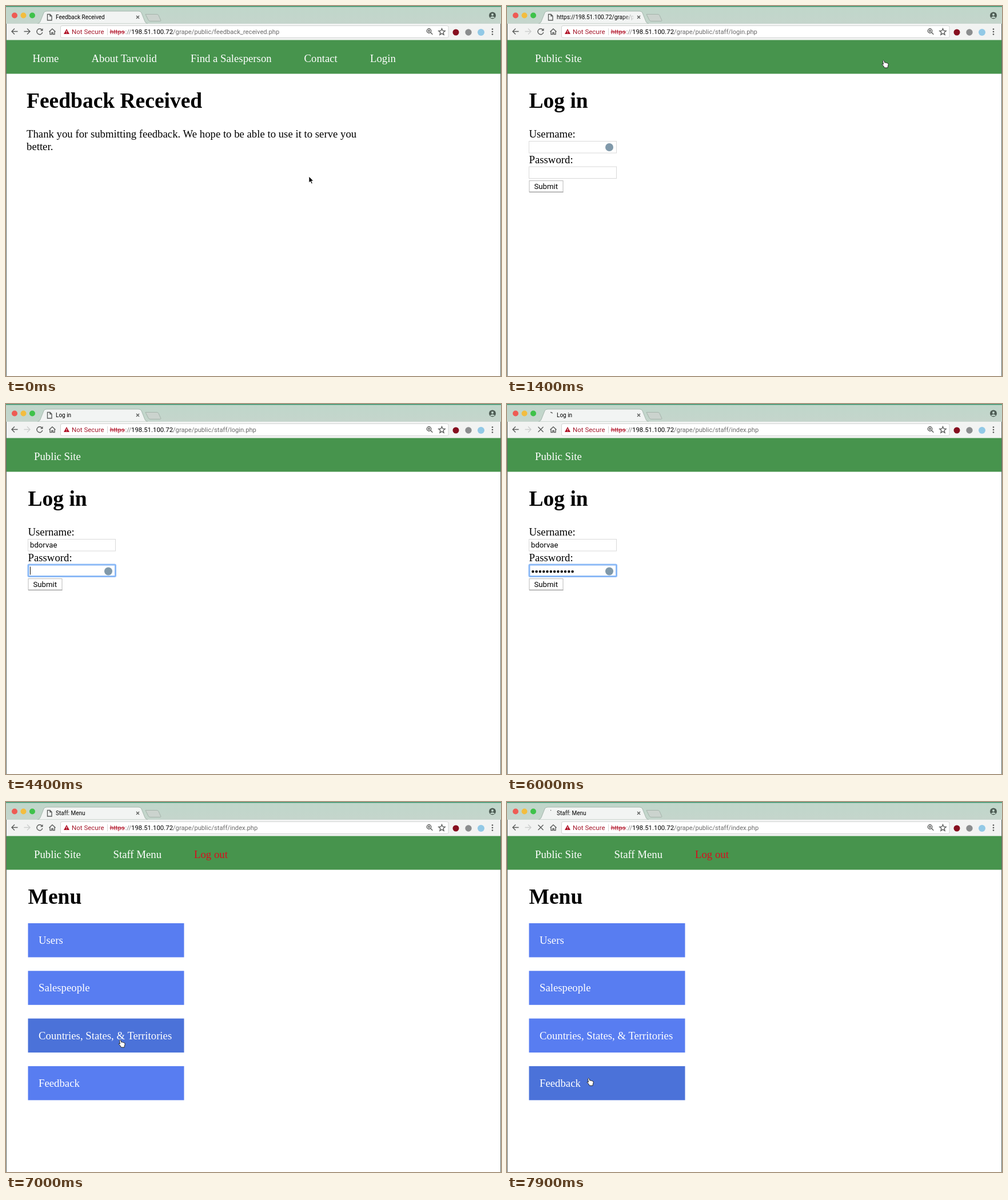
An HTML page for the animation above (8000 ms loop, 866 px wide and 647 px high).

```html
<!DOCTYPE html>
<html lang="en">
<head>
<meta charset="utf-8">
<title>Login walkthrough</title>
<style>
  html, body { margin: 0; width: 100%; height: 100%; overflow: hidden; background: #fff; }
  svg { display: block; }
  text { white-space: pre; }
  .serif { font: 18.75px "Liberation Serif", "Times New Roman", serif; }
  .serif .h1 { font-size: 37.5px; font-weight: bold; }
  .nav { fill: #fff; }
  .ui { font: 13.2px Roboto, "Liberation Sans", sans-serif; }
  .bar { font-size: 11.2px; }
  .icon { fill: none; stroke: #5b5d5c; stroke-width: 1.4; }
</style>
</head>
<body>
<svg width="866" height="647" viewBox="0 0 866 647">
  <defs>
    <linearGradient id="strip" x2="0" y2="1"><stop stop-color="#bfd7ca"/><stop offset="1" stop-color="#c5d5cc"/></linearGradient>
    <linearGradient id="fade"><stop stop-color="#f2f4f3" stop-opacity="0"/><stop offset="1" stop-color="#f2f4f3"/></linearGradient>
  </defs>
  <rect width="866" height="647" fill="#fff"/>

  <!-- tab strip -->
  <rect width="866" height="31" fill="url(#strip)"/>
  <rect width="866" height="1.5" fill="#3b9470"/>
  <circle cx="15" cy="16.5" r="5" fill="#ee5b54"/>
  <circle cx="30.5" cy="16.5" r="5" fill="#f3bd3f"/>
  <circle cx="46" cy="16.5" r="5" fill="#3ec24a"/>
  <path d="M244 14.5H264q2 0 3 2l4 9q0 1-2 1H252q-2 0-3-2z" fill="#cbd3ce" stroke="#a5b4ab"/>
  <path d="M55 31q4-1 5-4l6-15q1-3 5-3H232q4 0 5 3l6 15q1 3 5 4z" fill="#f2f4f3" stroke="#a5b7ad"/>
  <rect y="31" width="866" height="28.5" fill="#f2f3f2"/>
  <path id="doc" class="icon" d="M72.5 14.5h4.5l3 3v7.500h-7.500zM77 14.500v3h3" stroke-width="1"/>
  <path id="spin" class="icon"/>
  <text id="tab" class="ui" x="87" y="22.8" style="font-size:10px"></text>
  <rect x="202" y="12" width="21" height="15" fill="url(#fade)"/>
  <rect x="223" y="12" width="12" height="15" fill="#f2f4f3"/>
  <path class="icon" d="M228 17l5 5m0-5l-5 5" stroke-width="1.2"/>
  <g fill="#4d5c54"><circle cx="851" cy="16.500" r="6"/><path d="M847.500 19.500q3.500-3 7 0v1.500h-7z" fill="#c0d5ca"/><circle cx="851" cy="15" r="2" fill="#c0d5ca"/></g>

  <!-- toolbar -->
  <path class="icon" d="M20.500 44.500H10m5-5l-5 5 5 5"/>
  <path id="forward" class="icon" d="M31.500 44.500H42m-5-5l5 5-5 5"/>
  <g id="reload"><path class="icon" d="M62.800 41.500a5 5 0 1 0 1 4.500"/><path d="M64.500 39v4.500h-4.500z" fill="#5b5d5c"/></g>
  <path id="stop" class="icon" d="M54.500 40l9 9m0-9l-9 9"/>
  <path class="icon" d="M75.500 45l5.500-5 5.500 5m-9.500-1v5.500h3v-3h2v3h3V44" stroke-width="1.200"/>
  <rect x="95.500" y="34.500" width="678.500" height="21" rx="2.500" fill="#fff" stroke="#d2d4d3"/>
  <path d="M106 40l5 9h-10z" fill="#b01025"/>
  <path d="M106 43v3m0 1v1" stroke="#fff"/>
  <path d="M177.500 39v12" stroke="#d6d6d6"/>
  <g class="ui bar">
    <text x="115" y="49" fill="#a5182b" style="font-size:11.5px">Not Secure</text>
    <text x="182" y="49" fill="#b01025">https</text>
    <path d="M181.500 45.500h26.500" stroke="#b01025"/>
    <text x="208.500" y="49" fill="#777">://</text>
    <text x="219" y="49" style="font-size:11.4px">198.51.100.72</text>
    <text id="path" x="292" y="49" fill="#6b6b6b"></text>
  </g>
  <g class="icon" stroke-width="1.200">
    <circle cx="740" cy="43.500" r="3.700"/><path d="M742.800 46.300l3.500 3.500M738 43.500h4m-2-2v4"/>
    <path d="M762.500 39.500l1.600 3.700 4 .4-3 2.600.9 4-3.500-2.100-3.500 2.100.9-4-3-2.600 4-.4z"/>
  </g>
  <circle cx="787" cy="46" r="5.500" fill="#860f1f"/>
  <circle cx="809" cy="46" r="5.700" fill="#8b8d8e"/>
  <circle cx="831" cy="46" r="6" fill="#92c9e6"/>
  <g fill="#555"><circle cx="851" cy="40.500" r="1.300"/><circle cx="851" cy="45" r="1.300"/><circle cx="851" cy="49.500" r="1.300"/></g>

  <!-- pages -->
  <rect y="59.500" width="866" height="59" fill="#47944d"/>
  <g class="serif">
    <g id="home">
      <g class="nav">
        <text x="46.500" y="97.500">Home</text><text x="149.500" y="97.500">About Tarvolid</text>
        <text x="323" y="97.500">Find a Salesperson</text><text x="521.500" y="97.500">Contact</text>
        <text x="637" y="97.500">Login</text>
      </g>
      <text class="h1" x="36" y="177.500">Feedback Received</text>
      <text x="36" y="229.500">Thank you for submitting feedback. We hope to be able to use it to serve you</text>
      <text x="36" y="251.500">better.</text>
    </g>
    <text id="site" class="nav" x="49" y="97.500">Public Site</text>
    <g id="login">
      <text class="h1" x="38.500" y="177.500">Log in</text>
      <text x="38.500" y="229.500">Username:</text>
      <text x="38.500" y="275">Password:</text>
      <g fill="#fff" stroke="#d9d9d9"><rect x="38.500" y="236.500" width="153" height="20.500"/><rect x="38.500" y="281" width="153" height="20.500"/></g>
      <rect id="ring" x="39" y="236.500" width="152.500" height="20.500" rx="1.500" fill="#fff" stroke="#8bb9f6" stroke-width="3"/>
      <text id="user" class="ui" x="42" y="251"></text>
      <g id="dots"></g>
      <circle id="key" cx="179" r="7" fill="#8099aa"/>
      <path id="caret" stroke="#111"/>
      <rect x="39" y="305.500" width="59" height="19.500" fill="#fff" stroke="#b9b9b9"/>
      <path d="M39 325.500h59.500" stroke="#999"/>
      <text class="ui" x="47.500" y="319.700">Submit</text>
    </g>
    <g id="menu">
      <text class="nav" x="187.500" y="97.500">Staff Menu</text>
      <text x="329" y="97.500" fill="#d90d1f">Log out</text>
      <text class="h1" x="38.500" y="177.500">Menu</text>
      <g id="items"></g>
    </g>
  </g>
  <path d="M.5 31v616M865.500 31v616" stroke="#5f6d69"/>

  <!-- pointers, drawn from the hot spot -->
  <path id="arrow" d="M0 0v11l2.500-2.300 1.900 4 1.900-.8-1.900-3.900h3.400z" stroke="#fff" stroke-width=".8"/>
  <path id="hand" d="M-1.500 1q1-2 2.300 0l1.200 3.200q2-1 2.500.4 2-.7 2.300.8 1.600 0 1.400 2l-.8 3-.5 2.600H1.500L-.5 9.700l-2.500-2.500q0-1.700 2.400-.2z" fill="#fff" stroke="#222"/>
  <path id="beam" class="icon" d="M-2.500-5.500q2.500 0 2.500 1.500v8q0 1.500-2.500 1.500M2.500-5.500Q0-5.500 0-4M0 4q0 1.500 2.500 1.500" style="stroke:#222;stroke-width:1.100"/>
</svg>
<script>
const LOOP = 8000, STEP = 100, USER = 'bdorvae', ROW = 83.3, ROW_H = 59.5;
const $ = id => document.getElementById(id);
const show = (id, on) => $(id).setAttribute('display', on ? 'inline' : 'none');
const set = (id, attrs) => { for (const k in attrs) $(id).setAttribute(k, attrs[k]); };
const between = (t, a, b) => t >= a && t < b;
const clamp = (v, lo, hi) => Math.max(lo, Math.min(hi, v));

$('items').innerHTML = ['Users', 'Salespeople', 'Countries, States, &amp; Territories', 'Feedback'].map((label, i) =>
  `<rect x="38.5" y="${212 + i * ROW}" width="273" height="${ROW_H}"/>
   <text class="nav" x="57" y="${248 + i * ROW}">${label}</text>`).join('');
const rows = [...document.querySelectorAll('#items rect')];
$('dots').innerHTML = Array.from({length: 12}, (_, i) =>
  `<circle cx="${45.3 + i * 6.3}" cy="293" r="2.2"/>`).join('');
const dots = [...$('dots').children];

// Pointer stops: time, x, y
const stops = [[0, 530, 298], [900, 659, 95], [1500, 659, 95], [2300, 116, 241],
  [6300, 116, 241], [6900, 200, 416], [7200, 200, 416], [7700, 143, 483], [LOOP, 143, 483]];

function pointerAt(t) {
  const i = stops.findIndex(s => s[0] > t), [t0, x0, y0] = stops[i - 1], [t1, x1, y1] = stops[i];
  const u = (t - t0) / (t1 - t0), e = u * u * (3 - 2 * u);
  return [x0 + (x1 - x0) * e, y0 + (y1 - y0) * e];
}

function drawBrowser(t, page) {
  const start = [7900, 5900, 1000].find(s => t >= s);
  const loading = between(t, 1000, 1300) || between(t, 5900, 6200) || t >= 7900;
  show('doc', !loading);
  show('reload', !loading);
  show('stop', loading);
  show('spin', loading);
  if (loading) {
    const a = (t - start) / 300 * 2 + .25;
    set('spin', {d: `M76 14.5A4.500 4.500 0 0 1 ${76 + 4.5 * Math.sin(a)} ${19 - 4.5 * Math.cos(a)}`});
  }
  $('tab').textContent = page === 'home' ? 'Feedback Received' : page === 'menu' ? 'Staff: Menu'
    : t < 1500 ? 'https://198.51.100.72/grape/pub' : 'Log in';
  $('path').textContent = '/grape/public/' + (t < 1100 ? 'feedback_received' : t < 5900 ? 'staff/login' : 'staff/index') + '.php';
  $('forward').style.stroke = t < 1100 ? '' : '#cdcfce';
}

function drawForm(t) {
  const typed = clamp(Math.floor((t - 2700) / 190), 0, USER.length);
  const count = clamp(Math.floor((t - 4500) / 95), 0, dots.length);
  const inPassword = t >= 4300, focusStart = inPassword ? 4300 : 2400;
  const typing = between(t, 2800, 4100) || between(t, 4500, 5700);
  $('user').textContent = USER.slice(0, typed);
  dots.forEach((d, i) => d.setAttribute('display', i < count ? 'inline' : 'none'));
  show('ring', t >= 2400);
  set('ring', {y: inPassword ? 281 : 236.5});
  set('key', {cy: inPassword ? 292.5 : 247});
  const x = 42.5 + (inPassword ? count * 6.3 : typed ? $('user').getComputedTextLength() : 0);
  set('caret', {d: `M${x} ${inPassword ? 284.5 : 239.5}v14`});
  show('caret', t >= 2400 && (typing || Math.floor((t - focusStart) / 500) % 2 === 0));
}

function drawPointer(t, page) {
  const [x, y] = pointerAt(t), inRow = (y - 212) % ROW < ROW_H && y >= 212;
  const row = page === 'menu' && t >= 6300 && inRow ? Math.floor((y - 212) / ROW) : -1;
  rows.forEach((r, i) => r.setAttribute('fill', i === row ? '#4b72d9' : '#587df1'));
  let kind = 'arrow';
  if (row >= 0 || between(t, 1300, 1600) || (page === 'home' && x > 636 && y < 105)) kind = 'hand';
  else if (page === 'login' && x < 192 && y > 235) kind = 'beam';
  const visible = !between(t, 2800, 6300);
  for (const id of ['arrow', 'hand', 'beam']) {
    show(id, visible && id === kind);
    set(id, {transform: `translate(${x} ${y})`});
  }
}

function draw(now) {
  const t = Math.floor(now % LOOP / STEP) * STEP;
  const page = t < 1300 ? 'home' : t < 6200 ? 'login' : 'menu';
  for (const id of ['home', 'login', 'menu']) show(id, id === page);
  show('site', page !== 'home');
  drawBrowser(t, page);
  drawForm(t);
  drawPointer(t, page);
}

let origin;
function tick(now) {
  origin ??= now;
  draw(now - origin);
  requestAnimationFrame(tick);
}
draw(0);
requestAnimationFrame(tick);
</script>
</body>
</html>
```
